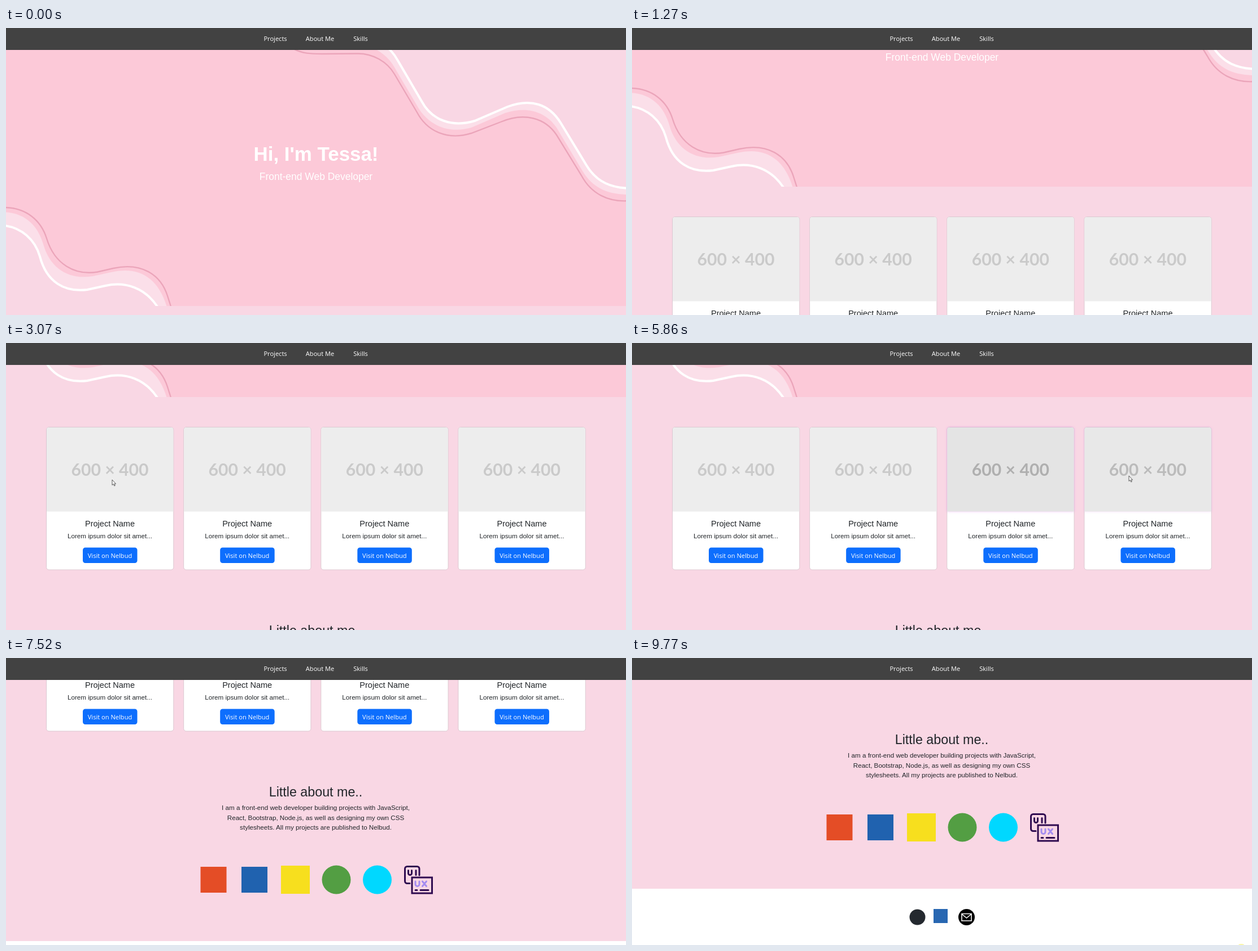
Write an HTML page that moves like this. It is 1098x510 px and loops after 9.84 s.

```html
<!DOCTYPE html>
<html lang="en">
<head>
<meta charset="utf-8">
<title>Portfolio</title>
<style>
  html, body { margin: 0; width: 100%; height: 100%; overflow: hidden; background: #fff; }
  svg { display: block; width: 1098px; height: 510px; }
  text { text-anchor: middle; font: 11.63px "Liberation Sans", Arial, sans-serif; fill: #212529; }
  .ui { font: 500 11.1px "Open Sans", "Noto Sans", sans-serif; fill: #fff; }
  .hello { font-size: 34.9px; font-weight: bold; fill: #fff; }
  .role { font-size: 17.45px; fill: #fff; }
  .title { font-size: 14.54px; }
  .heading { font-size: 23.27px; }
  .size { font: bold 30.2px Lato, sans-serif; }
  .rose { fill: none; stroke: #eba5ba; stroke-width: 2.4; }
  .band { fill: #fbdfe9; }
  .edge { fill: #f9d7e4; stroke: #fff; stroke-width: 4; }
  .ink { fill: none; stroke: #2f0b50; stroke-width: 3; stroke-linecap: round; }
</style>
</head>
<body>
<svg viewBox="0 0 1098 510">
  <g id="page">
    <rect width="1098" height="494" fill="#fcc9d8"/>
    <path class="band" d="M640 30C662 40 678 52 688 70L728 138C748 174 784 188 824 177L884 151C922 139 955 148 975 177L1021 254C1040 286 1068 297 1110 296V30Z"/>
    <path class="edge" d="M668 30C680 36 688 47 694 58L736 130C754 164 790 177 830 165L888 140C930 124 962 136 982 168L1028 244C1046 274 1072 285 1110 285V30Z"/>
    <path class="rose" d="M505 35C525 46 540 46 560 46L622 45.5C650 45 675 60 688 82L728 150C746 184 782 200 824 187L876 167C918 149 955 160 975 190L1019 262C1036 294 1066 310 1104 307"/>
    <path class="band" d="M-10 327C32 326 56 350 66 384C78 428 112 448 154 441L186 434C238 422 270 446 285 496V500H-10Z"/>
    <path class="edge" d="M-10 350.5C28 352 52 378 60 406C72 452 104 470 144 465L176 458C212 450 246 462 268 495L270 500H-10Z"/>
    <path class="rose" d="M-4 319C36 319 62 342 72 374C86 420 122 440 162 433.5L190 427C240 416 274 438 286 476L293 498"/>
    <text class="hello" x="549" y="236">Hi, I'm Tessa!</text>
    <text class="role" x="549" y="270">Front-end Web Developer</text>

    <rect y="494" width="1098" height="680" fill="#f9d7e4"/>
    <g id="cards"></g>

    <text class="heading" x="548.500" y="917">Little about me..</text>
    <text x="548.500" y="941">I am a front-end web developer building projects with JavaScript,</text>
    <text x="548.500" y="958.5">React, Bootstrap, Node.js, as well as designing my own CSS</text>
    <text x="548.500" y="976">stylesheets. All my projects are published to Nelbud.</text>

    <rect x="344.5" y="1042" width="46" height="46" fill="#e44d26"/>
    <rect x="417" y="1042" width="46" height="46" fill="#2062af"/>
    <rect x="487" y="1040" width="51" height="50" fill="#f7df1e"/>
    <circle cx="585" cy="1065" r="25.5" fill="#539e43"/>
    <circle cx="657.5" cy="1065" r="25.5" fill="#00d8ff"/>
    <g class="ink">
      <path d="M715 1071.5H710.500a4 4 0 0 1-4-4V1045.500a4 4 0 0 1 4-4H728a4 4 0 0 1 4 4V1057"/>
      <path d="M712.500 1048.500v5a3 3 0 0 0 6 0v-5M726 1048.500v8"/>
      <path d="M719 1061H754.500V1089H719ZM725 1083.500h3M734 1083.500h14"/>
      <path d="M725 1068v5a3.500 3.500 0 0 0 7 0v-5M737.500 1068l7 8.500M744.500 1068l-7 8.500" stroke="#a48cf0"/>
    </g>

    <rect y="1174" width="1098" height="100" fill="#fff"/>
    <circle cx="505.500" cy="1224.500" r="14" fill="#24292f"/>
    <rect x="534" y="1210" width="25" height="25" fill="#2867b2"/>
    <circle cx="592.500" cy="1224.500" r="14.500" fill="#000"/>
    <path d="M584 1218.500h17v12.500h-17ZM584 1219l8.500 7 8.500-7" fill="none" stroke="#fff" stroke-width="1.600"/>
  </g>

  <rect width="1098" height="39" fill="#424242"/>
  <text class="ui" x="477" y="23">Projects</text>
  <text class="ui" x="556" y="23">About Me</text>
  <text class="ui" x="628" y="23">Skills</text>

  <path id="cursor" d="M0 0V9.500L2.200 7.600 3.800 11 5.300 10.300 3.800 7.200H6.500Z" fill="#fff" stroke="#333" stroke-width=".8"/>
  <ellipse id="spot" cx="1079" cy="510" rx="5" ry="2" fill="#faf6a6"/>
</svg>
<script>
const $ = id => document.getElementById(id);
const LOOP = 9840, TICKS = 148, FADE = 7.5;

// Times below are in ticks, 148 to a loop.
const scrollKeys = [[9, 0], [19, 212], [24, 316], [28, 376], [31, 398],
  [101, 398], [104, 483], [113, 671], [116, 751], [117, 764]];
const cursorKeys = [[38, 1074, 215], [42, 1050, 225], [45, 210, 240], [46, 188, 243],
  [53, 200, 252], [58, 298, 296], [66, 420, 260], [72, 548, 298], [79, 660, 280],
  [86, 793, 240], [88, 880, 236], [92, 1030, 246], [95, 1084, 262], [97, 1098, 290]];
const hovers = [[45.9, 58], [58.6, 72], [72.5, 86.3], [86.3, 92]];

$('cards').innerHTML = hovers.map((_, i) => `
  <g transform="translate(${71.5 + 243.15 * i} 547.5)">
    <rect width="225.300" height="253.500" rx="4.500" fill="#fff" stroke="#dcc8d1"/>
    <g class="image">
      <path d="M.5 150V4.500a4 4 0 0 1 4-4H220.800a4 4 0 0 1 4 4V150Z"/>
      <text class="size" x="112.500" y="86">600 × 400</text>
    </g>
    <text class="title" x="112.500" y="176">Project Name</text>
    <text x="112.500" y="197.500">Lorem ipsum dolor sit amet...</text>
    <rect x="64.500" y="214" width="96.500" height="27.500" rx="4.400" fill="#0d6efd"/>
    <text class="ui" x="112.500" y="232">Visit on Nelbud</text>
  </g>`).join('');
const images = document.querySelectorAll('.image');

const clamp = v => Math.min(1, Math.max(0, v));
const ease = v => { const u = clamp(v) ** .6; return u * u * (3 - 2 * u); };
const grey = v => `rgb(${v},${v},${v})`;

function track(keys, t, column = 1) {
  let i = 0;
  while (i < keys.length - 2 && t >= keys[i + 1][0]) i++;
  const a = keys[i], b = keys[i + 1];
  return a[column] + (b[column] - a[column]) * clamp((t - a[0]) / (b[0] - a[0]));
}

function draw(now) {
  const t = Math.floor(now % LOOP / LOOP * TICKS + .06) % TICKS;
  $('page').setAttribute('transform', `translate(0 ${-track(scrollKeys, t)})`);
  $('cursor').setAttribute('transform',
    `translate(${track(cursorKeys, t)} ${track(cursorKeys, t, 2)})`);
  $('cursor').style.display = t >= 38 && t < 97 ? '' : 'none';
  $('spot').style.display = t === TICKS - 1 ? '' : 'none';
  hovers.forEach(([enter, leave], i) => {
    const h = ease((t - enter) / FADE) - ease((t - leave) / FADE);
    const [box, label] = images[i].children;
    box.style.fill = grey(237 - 14 * h);
    label.style.fill = grey(202 - 42 * h);
    box.style.filter = h > 0 ? `drop-shadow(0 0 2px rgba(225,110,235,${.6 * h}))` : 'none';
  });
}

function loop() {
  draw(performance.now());
  requestAnimationFrame(loop);
}
loop();
</script>
</body>
</html>
```
